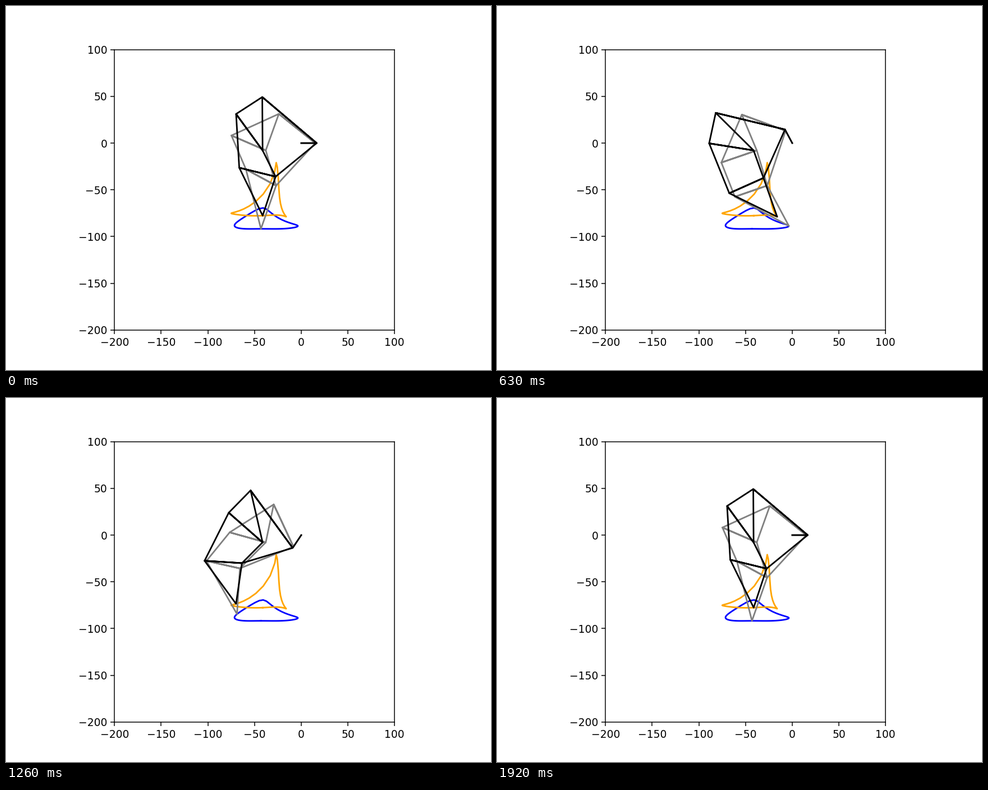
These frames come from a looping animation (864 px wide and 648 px high, 1950 ms). A matplotlib script:

```python
import numpy as np
import matplotlib.pyplot as plt
from matplotlib.animation import FuncAnimation

FRAMES = 65
ANGLES = np.linspace(0, 2 * np.pi, FRAMES)

# Bar lengths of the two walking-leg linkages
CLASSIC = dict(a=38, b=41.5, c=39.3, d=40.1, e=55.8, f=39.4, g=36.7,
               h=65.7, i=49, j=50, k=61.9, l=7.8, m=15)
VARIANT = dict(a=41.4, b=57.1, c=31.35, d=48.2, e=33.4, f=57.6, g=40.1,
               h=57.1, i=44, j=76.3, k=56.75, l=7.8, m=16.5)


def meet(p, rp, q, rq):
    """Intersection of two circles, on the left of the line p -> q."""
    dist = abs(q - p)
    u = (q - p) / dist
    x = (rp**2 - rq**2 + dist**2) / (2 * dist)
    return p + u * (x + 1j * np.sqrt(max(rp**2 - x**2, 0)))


def pose(s, angle):
    """Outline through all bars, and the foot, as complex points."""
    axle = 0j
    crank = s["m"] * np.exp(1j * angle)
    pivot = complex(-s["a"], -s["l"])
    top = meet(pivot, s["b"], crank, s["j"])
    back = meet(pivot, s["d"], top, s["e"])
    knee = meet(crank, s["k"], pivot, s["c"])
    heel = meet(knee, s["g"], back, s["f"])
    foot = meet(knee, s["i"], heel, s["h"])
    path = [axle, crank, top, back, pivot, top, crank, knee, pivot,
            back, heel, knee, foot, heel, knee]
    return np.array(path), foot


fig, ax = plt.subplots(figsize=(6.4, 4.8), dpi=135)
ax.set_aspect("equal")
ax.set_xlim(-200, 100)
ax.set_ylim(-200, 100)

for spec, color in ((CLASSIC, "blue"), (VARIANT, "orange")):
    trace = np.array([pose(spec, t)[1] for t in ANGLES])
    ax.plot(trace.real, trace.imag, color=color)

legs = [(spec, ax.plot([], [], color=color)[0])
        for spec, color in ((CLASSIC, "gray"), (VARIANT, "black"))]


def update(n):
    for spec, line in legs:
        path, _ = pose(spec, ANGLES[n])
        line.set_data(path.real, path.imag)
    return [line for _, line in legs]


anim = FuncAnimation(fig, update, frames=FRAMES, interval=30, repeat=True)
plt.show()
```
